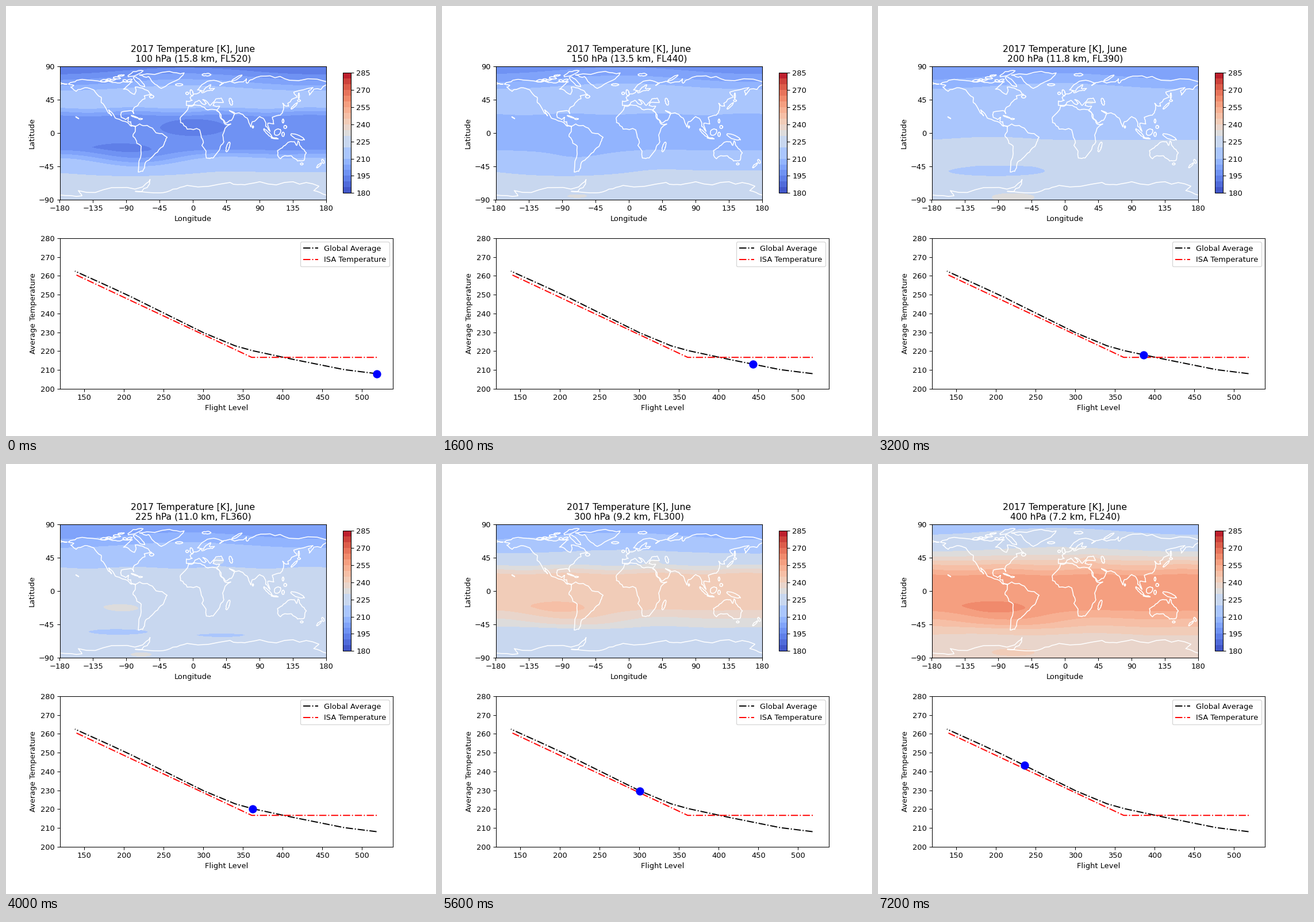
Recreate the animation shown at these times as a matplotlib script. Size 748 px wide and 748 px high, loop 8000 ms.

```python
import numpy as np
import matplotlib.pyplot as plt
from matplotlib.animation import FuncAnimation
from matplotlib.cm import ScalarMappable
from matplotlib.colors import BoundaryNorm, ListedColormap

rng = np.random.default_rng(7)

PRESSURES = np.array([100, 125, 150, 175, 200, 225, 250, 300,
                      350, 400, 450, 500, 550, 600])
HEIGHTS = 44.33 * (1 - (PRESSURES / 1013.25) ** 0.1903)  # km
FLIGHT_LEVELS = HEIGHTS / 0.03048
AVERAGES = np.interp(FLIGHT_LEVELS, [138, 200, 301, 340, 362, 413, 478, 518],
                     [262.5, 250.7, 229.6, 222.8, 220.2, 215.6, 210.1, 208])

# The 210-220 and 220-230 bands each share one colour.
LEVELS = np.arange(180, 286, 5)
colors = plt.get_cmap("coolwarm")((np.arange(21) + 0.5) / 21)
colors[6:8] = colors[6:8].mean(axis=0)
colors[8:10] = colors[8:10].mean(axis=0)

# Mean temperature by latitude at a few pressures, interpolated between them
LAT_NODES = [90, 70, 50, 35, 20, -20, -40, -60, -90]
PROFILES = {
    100: [190.5, 203.5, 216, 211, 196.5, 196, 212, 223, 224],
    175: [200.5, 207.5, 216, 216, 213, 214, 217, 222.5, 229.5],
    225: [201, 206, 215, 218.5, 224, 227, 224, 221, 228],
    300: [205.5, 211, 221, 229.5, 242.5, 243, 235, 226, 222.5],
    400: [217, 223, 232.5, 245, 256, 258.5, 250.5, 240, 237],
}
LON, LAT = np.meshgrid(np.linspace(-180, 180, 181), np.linspace(-90, 90, 121))


def bump(lon, lat, width, height):
    return np.exp(-((LON - lon) / width) ** 2 - ((LAT - lat) / height) ** 2)


def temperature(pressure):
    """Zonal profile bent by planetary waves, with warm and cold patches."""
    profile = [np.interp(pressure, list(PROFILES), column)
               for column in zip(*PROFILES.values())]
    a = np.radians(LON)
    shift = 4.5 * np.cos(a + 0.2) / (1 + np.exp((52 - LAT) / 5))
    shift += ((3 * np.cos(2 * a - 0.7) - 6 * np.cos(a + 1.4))
              * np.exp(-((LAT + 38) / 16) ** 2))
    shift += 1.2 * np.cos(3 * a - 2) * np.exp(-((LAT - 28) / 12) ** 2)
    field = np.interp(LAT - shift, LAT_NODES[::-1], profile[::-1])

    field += np.interp(pressure, [100, 200], [-2.5, 4]) * bump(-98, -23, 45, 10)
    field += np.interp(pressure, [100, 200], [-3, 0]) * bump(0, 8, 50, 13)
    field += 4 * bump(34, 42, 12, 6)
    field -= 3 * bump(-95, -53, 70, 7)
    field -= 2 * bump(40, -61, 45, 5)
    field += 3.5 * bump(-70, -84, 45, 7)
    return field


def roughen(points, rounds=2, amount=0.09):
    """Turn key points into a ragged coast by moving the midpoints."""
    p = np.reshape(points, (-1, 2)).astype(float)
    for _ in range(rounds):
        step = np.diff(p, axis=0)
        normal = np.column_stack([-step[:, 1], step[:, 0]])
        push = np.clip(rng.normal(0, amount, (len(step), 1)), -0.2, 0.2)
        middle = p[:-1] + step / 2 + push * normal
        p = np.vstack([np.stack([p[:-1], middle], 1).reshape(-1, 2), p[-1:]])
    return p


def island(lon, lat, rx, ry, tilt):
    t = np.linspace(0, 2 * np.pi, 10)
    c, s = np.cos(np.radians(tilt)), np.sin(np.radians(tilt))
    x, y = rx * np.cos(t), ry * np.sin(t)
    return roughen(np.column_stack([lon + c * x - s * y, lat + s * x + c * y]), 1)


north_america = [
    -168, 66, -157, 71, -128, 70, -109, 68, -95, 69, -82, 69, -87, 65, -94, 59,
    -82, 53, -79, 52, -77, 58, -78, 62, -66, 59, -61, 57, -56, 52, -66, 50,
    -65, 46, -70, 43, -76, 36, -81, 31, -80, 26, -84, 30, -97, 28, -97, 21,
    -91, 18, -87, 21, -88, 16, -84, 15, -83, 10, -78, 9, -85, 10, -95, 16,
    -105, 20, -114, 31, -110, 23, -117, 32, -124, 41, -124, 48, -134, 58,
    -146, 61, -158, 56, -162, 59, -165, 62, -161, 64, -168, 66]
south_america = [
    -78, 8, -72, 12, -62, 10, -50, 0, -35, -6, -39, -15, -48, -26, -58, -35,
    -65, -42, -68, -52, -74, -53, -73, -38, -70, -18, -76, -14, -81, -5, -78, 2,
    -78, 8]
greenland = [-72, 78, -32, 83, -12, 81, -22, 71, -43, 60, -54, 68, -60, 76, -72, 78]
africa = [
    -6, 36, 10, 37, 20, 31, 32, 31, 37, 20, 43, 12, 51, 12, 40, -3, 40, -15,
    35, -24, 27, -34, 18, -34, 12, -17, 13, -9, 9, 4, -8, 5, -17, 14, -17, 21,
    -6, 36]
europe = [
    32, 31, 36, 36, 27, 37, 29, 41, 41, 41, 38, 47, 31, 46, 26, 40, 23, 37,
    19, 42, 13, 45, 18, 40, 16, 38, 8, 44, -1, 37, -9, 37, -9, 43, -1, 44,
    -4, 48, 8, 54, 10, 57, 12, 54, 22, 57, 29, 60, 22, 60, 24, 65, 17, 61,
    14, 56, 6, 58, 12, 65, 28, 71, 41, 67, 36, 64, 44, 68, 68, 69, 72, 73,
    73, 67, 80, 72, 104, 77, 130, 71, 180, 69]
asia = [
    180, 65, 163, 59, 157, 51, 156, 57, 162, 61, 136, 55, 140, 48, 128, 40,
    129, 36, 126, 36, 121, 40, 122, 31, 118, 24, 107, 21, 109, 12, 101, 13,
    104, 2, 98, 9, 97, 16, 90, 22, 80, 15, 78, 8, 73, 20, 67, 25, 57, 26,
    49, 30, 56, 25, 52, 17, 44, 13, 35, 28, 32, 30]
chukotka = [-180, 69, -170, 66, -180, 65]
australia = [
    142, -11, 146, -19, 153, -27, 150, -37, 141, -38, 136, -34, 131, -31,
    118, -35, 114, -24, 122, -18, 131, -12, 137, -12, 140, -17, 142, -11]
antarctica = [
    -180, -84, -150, -85, -155, -78, -110, -74, -68, -73, -58, -63, -62, -74,
    -78, -79, -45, -81, -27, -76, -8, -71, 50, -67, 70, -70, 90, -66, 135, -66,
    170, -72, 163, -78, 180, -84]

# Centre, half axes and tilt
islands = [
    (-79, 21.7, 5, 0.8, -20), (-71, 18.8, 2.5, 0.8, 0), (-56, 49, 3, 2, 0),
    (-156.5, 20.5, 2.2, 0.3, -30), (-73, 69, 10, 2.5, -40), (-78, 80, 11, 2.2, 20),
    (-19, 65, 5, 1.5, 0), (-2, 54, 2, 4.5, 15), (-8, 53.4, 2, 1.7, 0),
    (18, 78.5, 6, 1.8, 0), (59, 73.8, 8, 1.3, 30), (51, 42, 2.3, 5, 15),
    (142.8, 50, 0.8, 4, 0), (136.5, 36.3, 6, 1.2, 45), (143, 43.5, 2, 1.3, 0),
    (121.5, 16, 1.2, 2.8, 0), (124.5, 8, 2, 2.2, 0), (114, 1, 5, 3.8, 45),
    (101, 0, 8, 1.5, -45), (110, -7.3, 4.8, 0.6, -8), (121.5, -2, 1.8, 3, 0),
    (141, -5.5, 10, 2.6, -22), (146.7, -42, 1.8, 1.4, 0), (175.5, -38.5, 1.5, 3, 25),
    (170, -44, 4.5, 1.2, 45), (47, -19, 2, 7, -18), (80.8, 8, 0.8, 1.6, 0)]

coasts = [roughen(c) for c in (north_america, south_america, greenland, africa,
                               europe, asia, chukotka, australia, antarctica)]
coasts += [island(*shape) for shape in islands]
# Arctic archipelago
for lon in np.linspace(-120, -86, 7):
    coasts.append(island(lon, rng.uniform(70, 78), rng.uniform(3, 6),
                         rng.uniform(0.8, 1.8), rng.uniform(-20, 20)))

fig, (world, chart) = plt.subplots(2, 1, figsize=(8, 8), dpi=93.5)

world.set(xlim=(-180, 180), ylim=(-90, 90), aspect="equal",
          xticks=np.arange(-180, 181, 45), yticks=np.arange(-90, 91, 45),
          xlabel="Longitude", ylabel="Latitude")
for line in coasts:
    world.plot(*line.T, color="white", lw=1.2, zorder=2)

scale = ScalarMappable(BoundaryNorm(LEVELS, 21), ListedColormap(colors))
bar = fig.colorbar(scale, ax=world, shrink=0.8, aspect=15, ticks=LEVELS[::3])
bar.minorticks_off()

chart.plot(FLIGHT_LEVELS, AVERAGES, "k-.", label="Global Average")
isa_levels = np.array([140, 361, 520])
chart.plot(isa_levels, np.maximum(288.15 - 0.19812 * isa_levels, 216.65),
           "r-.", label="ISA Temperature")
marker, = chart.plot(FLIGHT_LEVELS[:1], AVERAGES[:1], "bo", ms=10)
chart.set(ylim=(200, 280), xlabel="Flight Level", ylabel="Average Temperature")
chart.legend()

bands = []


def update(i):
    while bands:
        bands.pop().remove()
    bands.append(world.contourf(LON, LAT, temperature(PRESSURES[i]), LEVELS,
                                colors=colors, zorder=1))
    world.set_title(f"2017 Temperature [K], June\n{PRESSURES[i]} hPa "
                    f"({HEIGHTS[i]:.1f} km, FL{round(FLIGHT_LEVELS[i], -1):.0f})")
    marker.set_data([FLIGHT_LEVELS[i]], [AVERAGES[i]])


anim = FuncAnimation(fig, update, frames=10, interval=800, repeat=True)
plt.show()
```
